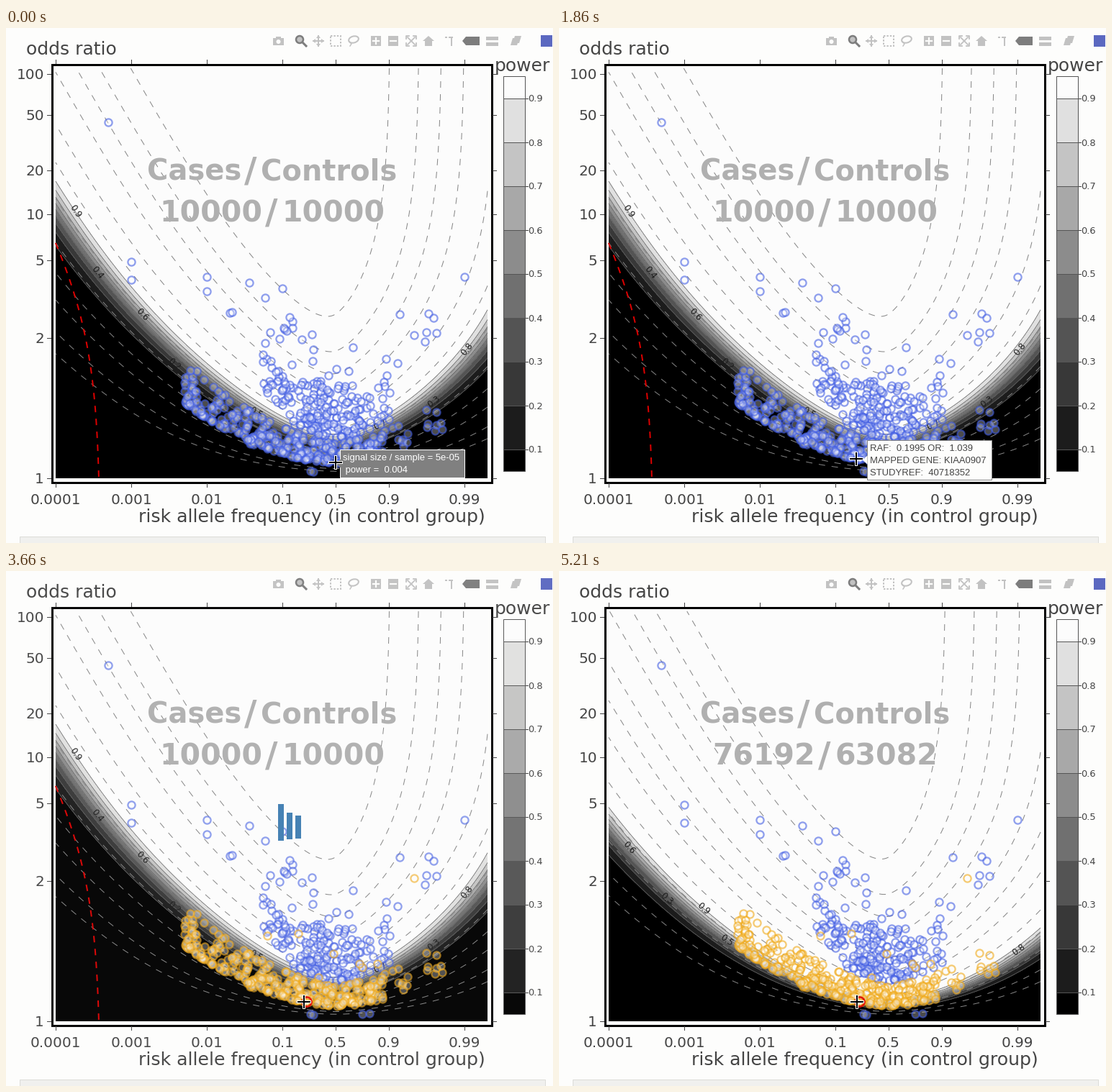
Write a matplotlib script that moves like this. It is 760x716 px and loops after 5270 ms.

```python
import math

import numpy as np
import matplotlib.pyplot as plt
from matplotlib.animation import FuncAnimation
from matplotlib.patches import Circle, Ellipse, Polygon, Rectangle

W, H = 760, 716
PX = 0.72  # points per pixel at 100 dpi
FRAMES, STEP = 85, 62

BG = "#fdfdfc"
INK = "#444444"
GRAY = "#858585"
ICON = "#c2c2c2"
ACTIVE = "#7d7d7d"
BLUE = (0.25, 0.36, 0.89)
GOLD = (0.94, 0.66, 0.08)
SHADES = [str(v) for v in np.linspace(0, 0.99, 10)]

fig = plt.figure(figsize=(7.6, 7.16), dpi=100, facecolor=BG)
ax = fig.add_axes([0, 0, 1, 1])
ax.set_xlim(0, W)
ax.set_ylim(H, 0)
ax.axis("off")


def text(x, y, s, size, color=INK, z=6, font="DejaVu Sans", **kw):
    return ax.text(x, y, s, fontsize=size * PX, color=color, zorder=z,
                   fontfamily=font, **kw)


def line(xs, ys, color=GRAY, lw=1.0, z=5, **kw):
    return ax.plot(xs, ys, color=color, lw=lw * PX, zorder=z, **kw)[0]


def rect(x, y, w, h, face="none", edge="none", lw=1.0, z=5, **kw):
    return ax.add_patch(Rectangle((x, y), w, h, facecolor=face, edgecolor=edge,
                                  lw=lw * PX, zorder=z, **kw))


def poly(points, face=ICON, z=5):
    return ax.add_patch(Polygon(points, fc=face, ec="none", zorder=z))


def smooth(x):
    x = min(max(x, 0.0), 1.0)
    return x * x * (3 - 2 * x)


# ---- scales -------------------------------------------------------------
def x_of(p):
    half = 105.2 * np.log10(2 * min(p, 1 - p))
    return 458 + half if p <= 0.5 else 458 - half


def freq_at(x):
    tail = 0.5 * 10 ** (-np.abs(x - 458) / 105.2)
    return np.where(x <= 458, tail, 1 - tail)


def y_of(ratio):
    return 626 - 81.46 * np.log(10 * ratio - 9)


def ratio_at(y):
    return 0.9 + 0.1 * np.exp((626 - y) / 81.46)


def signal(f, ratio, share):
    case = ratio * f / (1 - f + ratio * f)
    mean = share * case + (1 - share) * f
    return share * (1 - share) * (case - f) ** 2 / (mean * (1 - mean))


# ---- power map ----------------------------------------------------------
XS, YS = np.linspace(69, 669, 301), np.linspace(56, 626, 286)
GX, GY = np.meshgrid(XS, YS)
TENTHS = np.arange(1, 10) / 10
SIZES = [m * 10.0 ** e for e in range(-5, -1) for m in (1, 2, 5)]
erf = np.vectorize(math.erf)


def power_map(cases, controls, z_cut, labels):
    """Filled power bands, signal lines and labels given as {x: tenths}."""
    total = cases + controls

    def power(sig):
        return 0.5 + 0.5 * erf((np.sqrt(2 * total * sig) - z_cut) / math.sqrt(2))

    def height(x, level):
        column = power(signal(freq_at(x), ratio_at(YS), cases / total))
        return np.interp(level, column[::-1], YS[::-1])

    sig = signal(freq_at(GX), ratio_at(GY), cases / total)
    grid = power(sig)
    parts = [
        ax.contourf(GX, GY, grid, levels=TENTHS, colors=SHADES, extend="both",
                    zorder=1),
        ax.contour(GX, GY, grid, levels=TENTHS, colors="#606060",
                   linewidths=0.8 * PX, zorder=2),
        ax.contour(GX, GY, np.log10(sig + 1e-12), levels=np.log10(SIZES),
                   colors=GRAY, linewidths=PX, linestyles=[(0, (9, 9))],
                   zorder=2),
    ]
    for x, tenths in labels.items():
        level = tenths / 10
        slope = (height(x + 5, level) - height(x - 5, level)) / 10
        parts.append(text(x, height(x, level), f"{level}", 12, "#1c1c1c", 3,
                          ha="center", va="center",
                          rotation=-math.degrees(math.atan(slope))))
    return parts


small = power_map(10000, 10000, 4.02,
                  {96: 9, 127: 4, 189: 6, 234: 2, 347: 5, 520: 7, 595: 3, 640: 8})
large = power_map(76192, 63082, 4.37, {97: 6, 150: 3, 201: 9, 233: 5, 639: 8})

rare = np.linspace(1e-4, 3.72e-4, 60)
small.append(line([x_of(p) for p in rare], y_of(7.45e-4 / rare - 1), "#dc0000",
                  2, 3, linestyle=(0, (4.5, 4.5))))

# ---- frame, ticks and titles ----------------------------------------------
rect(63.5, 50.5, 611, 581, edge="black", lw=3)
for p in (0.0001, 0.001, 0.01, 0.1, 0.5, 0.9, 0.99):
    x = x_of(p)
    for y in (44, 633):
        line([x, x], [y, y + 5], INK)
    text(x, 662, f"{p:.4f}".rstrip("0"), 20, ha="center")
for v in (1, 2, 5, 10, 20, 50, 100):
    y = y_of(v)
    for x in (57, 676):
        line([x, x + 5], [y, y], INK)
    text(53, y + 7, str(v), 20, ha="right")
text(28, 37, "odds ratio", 25)
text(424.5, 687, "risk allele frequency (in control group)", 25.2, ha="center")
text(679, 60, "power", 25)


def headline(mid, base, size):
    style = dict(color="#b0b0b0", z=4, fontweight="bold")
    text(mid, base + 2, "/", 48, ha="center", **style)
    return (text(mid - 13, base, "", size, ha="right", **style),
            text(mid + 14, base, "", size, **style))


for part, word in zip(headline(340, 212, 40), ("Cases", "Controls")):
    part.set_text(word)
counts = headline(369, 269, 41)

# ---- colour bar ---------------------------------------------------------
for k, shade in enumerate(SHADES):
    top = max(585.5 - 61 * k, 66.5)
    bottom = min(646.5 - 61 * k, 616)
    rect(691, top, 30, bottom - top, shade, "#555555")
    if k < 9:
        line([721, 725], [top, top], INK)
        text(725, top + 5, f"0.{k + 1}", 13)

# ---- toolbar ------------------------------------------------------------
TY = 18
rect(371, 14, 15, 10, ICON)
rect(375, 12, 7, 3, ICON)
ax.add_patch(Circle((378.5, 19), 3, fc=BG, ec="none", zorder=6))
ax.add_patch(Circle((408, 16), 5, fc=ICON, ec=ACTIVE, lw=2.5 * PX, zorder=5))
line([412, 417], [20, 25], ACTIVE, 3)
line([427, 441], [TY, TY], ICON, 2)
line([434, 434], [11, 25], ICON, 2)
for dx, dy in ((1, 0), (-1, 0), (0, 1), (0, -1)):
    tip = np.array([434 + 8 * dx, TY + 8 * dy])
    back, side = np.array([dx, dy]) * 4, np.array([dy, dx]) * 3
    poly([tip, tip - back + side, tip - back - side])
rect(451, 11, 14, 14, edge=ICON, lw=2, linestyle=(0, (1.2, 1)))
ax.add_patch(Ellipse((483, 16), 14, 9, angle=-15, fc="none", ec=ICON,
                     lw=2 * PX, zorder=5))
line([477, 480, 478], [19, 22, 25], ICON, 1.5)
for cx in (514, 538):
    rect(cx - 7, TY - 7, 14, 14, ICON)
    line([cx - 4, cx + 4], [TY, TY], BG, 2.2, 6)
line([514, 514], [14, 22], BG, 2.2, 6)
for sx in (-1, 1):
    line([563 - 5, 563 + 5], [TY - 5 * sx, TY + 5 * sx], ICON, 1.8)
    for sy in (-1, 1):
        line([563 + 3 * sx, 563 + 7 * sx, 563 + 7 * sx],
             [TY + 7 * sy, TY + 7 * sy, TY + 3 * sy], ICON, 1.8)
poly([(579, 18), (587, 11), (595, 18)])
rect(582, 18, 10, 7, ICON)
line([610, 621], [13, 13], ICON, 2, linestyle=(0, (1.5, 1)))
line([619, 619], [13, 24], ICON, 2)
poly([(634, 18), (639, 12), (658, 12), (658, 24), (639, 24)], ACTIVE)
for y in (12, 20):
    rect(667, y, 17, 5, ICON)
for k in (0, 3):
    poly([(701 + k, 24 - k), (704 + k, 14 - k), (713 + k, 14 - k),
          (710 + k, 24 - k)])
rect(743, 10, 16, 16, "#5b68c0")
toolbar_veil = rect(360, 4, 400, 27, BG, z=7)

# ---- study points -------------------------------------------------------
rng = np.random.default_rng(11)


def study(x, sig):
    """Pixel place and signal of studies at column x."""
    f = freq_at(x)
    a = 4 * sig / (f * (1 - f))
    return np.column_stack([x, y_of(1 + a / 4 + np.sqrt(a * a / 16 + a)), sig])


def spread(n, low, high, bias=1.0):
    return low * (high / low) ** (rng.random(n) ** bias)


def near(n, mid, sd, low, high):
    return np.clip(rng.normal(mid, sd, n), low, high)


studies = np.vstack([
    study(rng.uniform(247, 330, 75), spread(75, 7e-5, 2.6e-4, 1.4)),
    study(rng.uniform(330, 528, 250), spread(250, 5.5e-5, 4.3e-4, 1.2)),
    study(rng.uniform(247, 315, 9), spread(9, 2.6e-4, 4.7e-4)),
    study(rng.uniform(528, 608, 16), spread(16, 7e-5, 4.5e-4)),
    study(near(125, 440, 22, 385, 540), spread(125, 6e-4, 8e-3, 1.3)),
    study(rng.uniform(353, 398, 34), spread(34, 1.2e-3, 5e-3)),
    study(rng.uniform(465, 536, 42), spread(42, 6e-4, 5e-3, 1.2)),
    study(near(24, 410, 70, 280, 606), spread(24, 6e-3, 4e-2)),
    study(rng.uniform(540, 608, 6), spread(6, 1e-3, 8e-3)),
    study(rng.uniform(420, 512, 4), np.full(4, 7e-6)),
])
lone = np.array([(142, 131), (174, 325), (174, 350), (279, 346), (279, 366),
                 (311, 396), (384, 362), (587, 397), (637, 346)])
is_gold = (studies[:, 2] < 5e-4) & (studies[:, 2] > 1e-5)
is_gold |= rng.random(len(studies)) < 0.03


def rings(pts, z):
    return ax.scatter(pts[:, 0], pts[:, 1], s=(10.2 * PX) ** 2,
                      linewidths=2.3 * PX, zorder=z)


def tint(dots, color):
    dots.set_edgecolor((*color, 0.58))
    dots.set_facecolor((1, 1, 1, 0.3))


blue_dots = rings(np.vstack([lone, studies[~is_gold, :2]]), 8)
turning_dots = rings(studies[is_gold, :2], 9)
tint(blue_dots, BLUE)
picked = ax.add_patch(Circle((418, 599), 6.5, fc="none", ec="#e01408",
                             lw=2.6 * PX, zorder=10))

# ---- hover box ----------------------------------------------------------
tip_box = rect(0, 0, 1, 1, z=11)
tip_arrow = poly([(0, 0)] * 3, z=12)
tip_rows = [text(0, 0, "", 13, z=13, font="Liberation Sans") for _ in range(3)]


def tip_content(t):
    if t < 600:
        return ["signal size / sample = 5e-05", " power =  0.004"]
    raf, ratio, gene = (("0.2043", "1.036", "KIAA2026") if t < 1190
                        else ("0.1995", "1.039", "KIAA0907"))
    return [f"RAF:  {raf} OR:  {ratio}", f"MAPPED GENE: {gene}",
            "STUDYREF:  40718352"]


def show_tip(t, cx, cy):
    on = t < 3040
    for part in (tip_box, tip_arrow, *tip_rows):
        part.set_visible(on)
    rows = tip_content(t)
    if len(rows) == 2:
        x, y, h, face, edge, ink = cx + 6, cy - 18, 39, "#808080", "white", "white"
    else:
        x, y, h, face, edge, ink = cx + 15, cy - 26, 55, BG, GRAY, INK
    tip_box.set_bounds(x, y, 173, h)
    tip_box.set(facecolor=face, edgecolor=edge)
    mid = y + h / 2
    tip_arrow.set_xy([(x - 6, mid), (x + 1, mid - 6), (x + 1, mid + 6)])
    tip_arrow.set_facecolor(face)
    for k, row in enumerate(tip_rows):
        row.set_text(rows[k] if k < len(rows) else "")
        row.set_position((x + 4, y + 15 + 17 * k))
        row.set_color(ink)


# ---- loading veil, spinner, pointer, lower panel ----------------------------
veil = rect(0, 0, W, H, BG, z=20)
rect(19, 706.5, 730, 30, "#f0f0ee", "#dcdcd8", z=21)
bars = [rect(x, 340, 8, 32, "steelblue", z=22) for x in (378, 390, 402)]
cross = [line([], [], color, lw, z, solid_capstyle="butt")
         for color, lw, z in ((BG, 4, 23), ("black", 2, 24)) for _ in range(2)]


def pulse(phase):
    phase %= 1
    return smooth(phase / 0.4) if phase < 0.4 else 1 - smooth((phase - 0.4) / 0.4)


def spin(t):
    """Phase of the last bar, or None while nothing is loading."""
    if 2112 <= t < 3040:
        return 0.69 + (min(t, 2740) - 2320) / 1000
    if 3650 <= t < 4280:
        return 0.21 + (min(t, 3932) - 3932) / 1000
    return None


def draw(i):
    t = i * STEP + 26
    first, done = t < 3040, t >= 4280

    for part in small:
        part.set_visible(not done)
    for part in large:
        part.set_visible(done)
    for part, number in zip(counts, (76192, 63082) if done else (10000, 10000)):
        part.set_text(str(number))

    tint(turning_dots, BLUE if first else GOLD)
    picked.set_visible(not first)

    go = smooth((t - 60) / 540)
    cx, cy = 458 - 44.5 * go, 604 - 5 * go
    if 1190 <= t < 3040:
        cx -= 1
    for k, part in enumerate(cross):
        arm = np.array([-1, 1]) * (10 if k < 2 else 9)
        part.set_data(cx + arm * (k % 2), cy + arm * (1 - k % 2))
    show_tip(t, cx, cy)

    shown = 4250 if done else 3010
    toolbar_veil.set_alpha(0 if first else 1 - smooth((t - shown) / 300))

    phase = spin(t)
    begin = 2112 if first else 3650
    veil.set_alpha(0 if phase is None else 0.69 * smooth((t - begin) / 250))
    for k, bar in enumerate(bars):
        bar.set_visible(phase is not None)
        if phase is not None:
            p = pulse(phase + 0.16 * (2 - k))
            bar.set_y(340 - 20 * p)
            bar.set_height(32 + 24 * p)
    return []


anim = FuncAnimation(fig, draw, frames=FRAMES, interval=STEP, repeat=True,
                     repeat_delay=0, blit=False)
plt.show()
```
